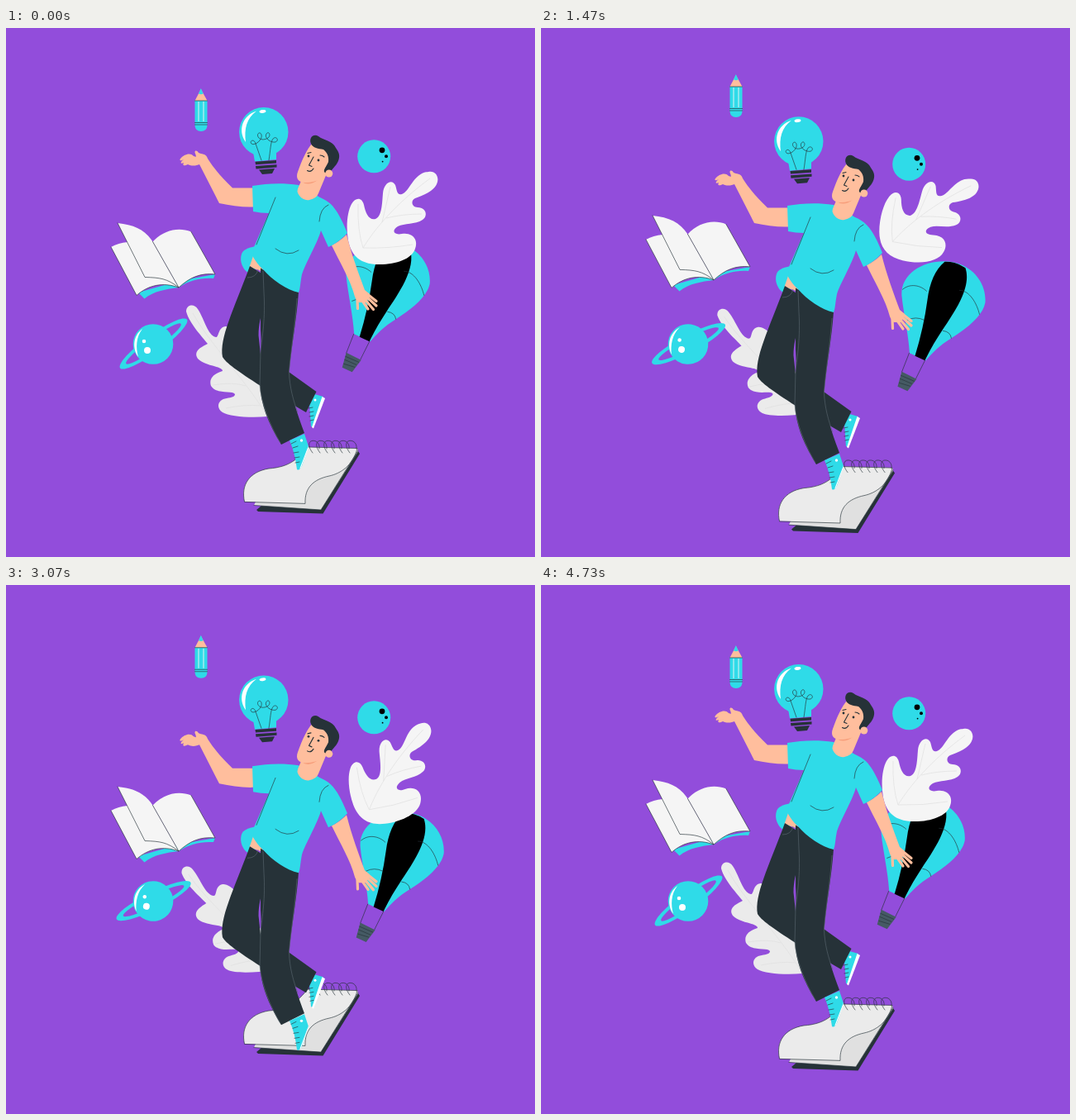
Animation, 640 px wide and 640 px high, one loop 4.76 s. Source, as an HTML page:

```html
<!DOCTYPE html>
<html lang="en">
<head>
<meta charset="utf-8">
<title>Floating ideas</title>
<style>
  html, body { margin: 0; height: 100%; overflow: hidden; background: #924ddb; }
  svg { display: block; width: 100vw; height: 100vh; }
  .cyan { fill: #2fdbe8; }
  .skin { fill: #ffbe9d; }
  .dark { fill: #263238; }
  .pale { fill: #f5f5f5; }
  .grey { fill: #ebebeb; }
  .white { fill: #fff; }
  .ink { fill: none; stroke: #263238; stroke-width: .65; stroke-linecap: round; stroke-linejoin: round; }
  .bold { stroke-width: 1.1; }
  .fingers { fill: none; stroke: #ffbe9d; stroke-width: 3.2; stroke-linecap: round; }
  .vein { fill: none; stroke: #e0e0e0; stroke-width: .7; }
  .seam { fill: none; stroke: #5d6b72; stroke-width: .6; }
</style>
</head>
<body>
<svg viewBox="0 0 640 640">
  <g id="balloon">
    <path class="cyan" d="M446.500 394C445 370 439 345 437 325C435 300 460 283 488 283C520 283 540 308 538 333C535 349 516 364 497 376C482 385 474 394 466 403Z"/>
    <path d="M489 283.500Q502 283 514 291C522 315 500 345 485 368C475 383 470 393 465 403L453 397.500C460 375 465 352 468 330C471 308 477 294 489 283.500Z"/>
    <path class="ink" d="M438 317C447 309 460 312 467 319M507 318C519 318 528 334 531 347M444 354Q454 349 464 354M487 367Q496 368 497 376M446 394L437 417M465 403L454 425"/>
    <path fill="#455a64" d="M437 416.500L455 425.500L444 440L432 434.500Z"/>
    <path class="ink" d="M436 421L452 428M435 425L449 431M434 430L447 434"/>
  </g>

  <g id="rightLeaf">
    <path class="pale" d="M511 174C520 172 525 181 521 189C517 198 503 203 495 206C489 209 491 217 498 217C508 217 511 227 504 232C495 238 482 236 474 240C466 245 469 251 479 249C492 247 499 256 495 267C491 280 470 287 448 286C430 285 418 277 414 257C411 240 413 222 418 213C423 204 431 205 433 214C435 224 439 233 447 231C455 228 455 211 456 200C457 187 467 182 471 190C473 196 473 203 479 201C488 199 493 175 511 174Z"/>
    <path class="vein" d="M432 266C446 243 472 212 513 182M432 266Q425 245 426 213M432 266Q462 267 492 262M455 235L465 192M460 230Q480 225 503 225"/>
  </g>

  <g id="leftLeaf">
    <path class="grey" d="M232 340C240 352 244 372 254 374C258 374 256 362 266 361C276 361 290 380 300 405C312 430 318 450 316 470C296 472 270 470 262 465C253 459 257 449 267 448C273 447 277 446 277 443C274 438 255 444 248 433C244 421 258 416 262 415C262 409 240 409 232 400C226 391 236 386 244 382C238 374 222 358 218 343C218 334 228 333 232 340Z"/>
    <path class="vein" d="M226 345C245 380 285 420 314 466M250 432Q275 428 290 433M266 460Q290 455 308 457"/>
  </g>

  <g id="planet">
    <path class="cyan" fill-rule="evenodd" transform="translate(178.500 382) rotate(-36)" d="M-50 0A50 10.500 0 1 1 50 0A50 10.500 0 1 1 -50 0ZM-41 0A41 6.300 0 1 1 41 0A41 6.300 0 1 1 -41 0Z"/>
    <circle class="cyan" cx="178" cy="382.500" r="24.300"/>
    <path class="white" d="M165 364C153 373 153 388 160 398C157 387 157 374 165 364Z"/>
    <circle class="white" cx="167" cy="379" r="2.300"/>
    <circle class="white" cx="171" cy="390" r="4"/>
  </g>

  <g id="notebook">
    <path class="dark" d="M303 583L309 578L380 580L424 509L428 515L383.500 587.500L305 585Z"/>
    <path fill="#e0e0e0" d="M300 577.500L303 571L362 525L425 508.500L426 512L381 583Z"/>
    <path class="grey" d="M288.500 573C284 553 294 537 318 533C344 531 353 521 365 507L425 508.500C420 529 405 539 391 542C372 546 361 556 362 575Z"/>
    <path class="ink" d="M288.500 573C284 553 294 537 318 533C344 531 353 521 365 507L425 508.500C420 529 405 539 391 542C372 546 361 556 362 575ZM300 577.500L381 583L426 511"/>
    <g id="rings" class="ink"></g>
  </g>

  <g id="man">
    <path class="cyan" d="M302 264Q291 266 287 270C282 276 283 290 294 297L304 290Z"/>
    <path class="skin" d="M299 276L294.500 289L314 296Z"/>

    <path class="cyan" d="M366 441L384 446L372 483L369 482Z"/>
    <path class="white" d="M382.500 446L386 448L372 484.500L370 483Z"/>
    <path class="ink" d="M366 460L371 459M367 465L372 464M367 470L372 469M368 475L372 474"/>
    <circle class="white" cx="374" cy="450" r="1.500"/>
    <path class="dark" d="M295 288L330 310C315 330 306 345 305.500 372L308 395L342 416L375.500 440L363 465L308 433C280 415 266 405 262 398C258 375 275 342 295 288Z"/>
    <path class="dark" d="M308 290.500L354 319C352 350 346 380 342.500 416C344 445 353 468 361 490L333 504C317 478 308 455 307 430C306 400 310 390 308 365Z"/>
    <path class="seam" d="M312 320C314 350 310 375 308 390L307 432C309 455 320 482 332 502M352 327C350 360 345 385 342.500 416C343 435 348 452 353 465M305 292Q303 302 292 302M311 294L312 320"/>
    <path class="cyan" d="M343 499L361 491L366 506L358 530Q355 536 352 534Q350 515 343 499Z"/>
    <path class="white" d="M366 505L365.500 509L357 532L355 534Z"/>
    <path class="ink" d="M345 503L351 500M347 508L353 506M348 514L354 513M349 520L355 519M350 526L355 525"/>
    <circle class="white" cx="357.500" cy="499" r="1.700"/>

    <path class="skin" d="M300 193.500L274 193.500C262 182 253 172 244 158C242 151 236 153 233 151C231 147 227 148 229 152C230 155 231 157 227 155C223 150 215 153 211 158C209 161 212 161 215 159C210 163 211 165 215 163C213 167 216 167 220 165C226 168 231 166 234 165L258 212C272 215 286 217 300 216.500Z"/>
    <path class="skin" d="M394 263Q404 258 412 250C418 274 427 298 434 317L440 322L436 332L427 332C423 328 423 327 422 325C417 305 404 284 394 263Z"/>
    <path class="fingers" d="M436 321L448 330.500M436 325L448 336M434 328L444.500 340.500M431 330L438 340M425 328L425.500 339.500"/>
    <path class="cyan" d="M298 191C315 188 335 187 354 190L380 205C394 211 401 219 413 248Q402 260 390 265L381 245C377 260 362 285 358 298C356 308 356 316 354 320C340 317 322 305 311 292C305 287 302 282 299 277L300 265L318 224Q308 224 299 222Z"/>
    <path class="ink" d="M326 205L303 262M326 267Q340 278 354 269M379 234Q380 218 390 214"/>

    <path class="skin" d="M358 180C357 188 353 192 352.500 198C355 206 362 209 367 208Q376 206 378 200L388 176Z"/>
    <path fill="#f79f7c" d="M358 186Q366 192 377 184Q368 188 358 186Z"/>
    <path class="skin" d="M371 139C364 146 358 160 353 174C350 182 354 187 362 187C372 187 380 183 386 180L394 160L392 146Z"/>
    <path class="dark" d="M369 140C366 133 372 127 378 131C384 136 395 136 399 145C401 148 404 152 403 157C402 164 397 168 394 172C391 176 387 177 385 174C384 171 388 167 390 162C391 155 388 150 384 147C378 146 371 145 369 140Z"/>
    <circle class="skin" cx="390.800" cy="176" r="4.500"/>
    <path class="ink bold" d="M365 151.500L369 150.500M380 154Q383 154 385 156M372 156L366.500 166L370 167.500M364.500 172.500Q369 175 372 170"/>
    <circle class="dark" cx="366" cy="155" r="1.400"/>
    <circle class="dark" cx="378" cy="160" r="1.400"/>
  </g>

  <g id="book">
    <path class="cyan" d="M160 320L167.500 327.500C179 318 194 316 209 314C222 305 236 302 251 303L253 298L209 306Z"/>
    <path class="pale" d="M127 265Q136 260 147 259L209 314C190 307 172 311 158 323.500Z"/>
    <path class="pale" d="M177.500 258.500C190 245 208 240 224 246.500L253 298C235 296 222 302 209 314Z"/>
    <path class="pale" d="M135 236C155 238 168 244 177.500 258.500L209 314C195 303 186 302 168 301.500Z"/>
    <path class="ink" d="M127 265L158 323.500C172 311 190 307 209 314L177.500 258.500M135 236L168 301.500C186 302 195 303 209 314C222 302 235 296 253 298L224 246.500"/>
  </g>

  <g id="bulb">
    <path class="cyan" d="M299 150H327V159L301 161.500Z"/>
    <circle class="cyan" cx="311.800" cy="125.800" r="29.700"/>
    <path class="white" d="M303 100.500C286 106 280 124 290 138C288 122 291 109 303 100.500Z"/>
    <ellipse class="white" cx="310.500" cy="101" rx="4" ry="1.900" transform="rotate(-8 310.500 101)"/>
    <path class="ink" d="M309 160L302 140C300 133 294 137 297 140C301 143 311 135 309 129C307 124 302 129 306 133C309 136 314 135 317 133C321 130 318 124 315 128C312 133 320 139 326 138C331 136 327 130 323 134C320 138 320 148 318 160"/>
    <path class="dark" d="M301.500 161.800L327 160V163.500L302 165.300ZM302 167L327.500 165.300V168.500L302.500 170.500ZM306 171.500L325 170L322 176L310 177Z"/>
  </g>

  <g id="pencil">
    <path class="cyan" d="M228.500 87H243.500V118Q243 125 236 125Q229 125 228.500 118Z"/>
    <path class="skin" d="M235.800 74L228.500 88H243.500Z"/>
    <path class="cyan" d="M235.800 73L233 79.500Q236 81 238.700 79.500Z"/>
    <path fill="none" stroke="#f5f5f5" stroke-width=".9" d="M233 89V113M239 89V113"/>
    <path class="ink" d="M228.500 88H243.500M228.500 114.500H243.500M228.500 117H243.500"/>
  </g>

  <g id="moon">
    <circle class="cyan" cx="445.200" cy="155.300" r="20"/>
    <circle cx="455" cy="147.800" r="3.400"/>
    <circle cx="460" cy="155.300" r="2"/>
    <circle cx="455.600" cy="161.600" r=".9"/>
  </g>
</svg>

<script>
const LOOP = 4760;
const part = id => document.getElementById(id);
const move = (id, x, y) => part(id).setAttribute('transform', `translate(${x} ${y})`);
const turn = (id, angle, x, y) => part(id).setAttribute('transform', `rotate(${angle} ${x} ${y})`);

// Goes from 0 to 1 and back once per period.
const swing = (t, period) => (1 - Math.cos(2 * Math.PI * t / period)) / 2;

const ease = p => p ** 1.8 / (p ** 1.8 + (1 - p) ** 1.8);

// Eases through [time, value] stops, then back to the first value.
function tween(t, stops) {
  const all = [[0, 0], ...stops, [LOOP, 0]];
  const i = all.findIndex(([time]) => time > t);
  const [t0, v0] = all[i - 1], [t1, v1] = all[i];
  return v0 + (v1 - v0) * ease((t - t0) / (t1 - t0));
}

function draw(t) {
  const slow = swing(t, LOOP);
  const drift = tween(t, [[1830, 26.7]]);

  move('man', 0, 35.2 * slow);
  move('bulb', 0, 16.5 * slow);
  move('pencil', 0, -19.6 * swing(t, LOOP / 2));
  move('book', 0, tween(t, [[LOOP / 3, -9.2], [LOOP * 2 / 3, 8.2]]));
  move('moon', 0, tween(t, [[LOOP / 3, 9.6], [LOOP * 2 / 3, 5]]));
  move('notebook', 0, tween(t, [[1660, 24.2], [3370, -20.5]]));
  move('balloon', drift - 25.3, drift * 0.93 - 23.7);
  turn('rightLeaf', tween(t, [[1660, 10.8], [3370, -11.2]]), 469, 226);
  turn('leftLeaf', -7 * slow, 274, 401);
  turn('planet', 12 * slow, 178, 382.5);
}

part('rings').innerHTML = Array.from({ length: 6 }, (_, i) => {
  const x = 371 + i * 9;
  return `<path d="M${x} 514C${x - 8} 504 ${x - 4} 497 ${x + 4} 500Q${x + 9} 503 ${x + 8} 509"/>`;
}).join('');

function tick() {
  draw(performance.now() % LOOP);
  requestAnimationFrame(tick);
}
tick();
</script>
</body>
</html>
```
